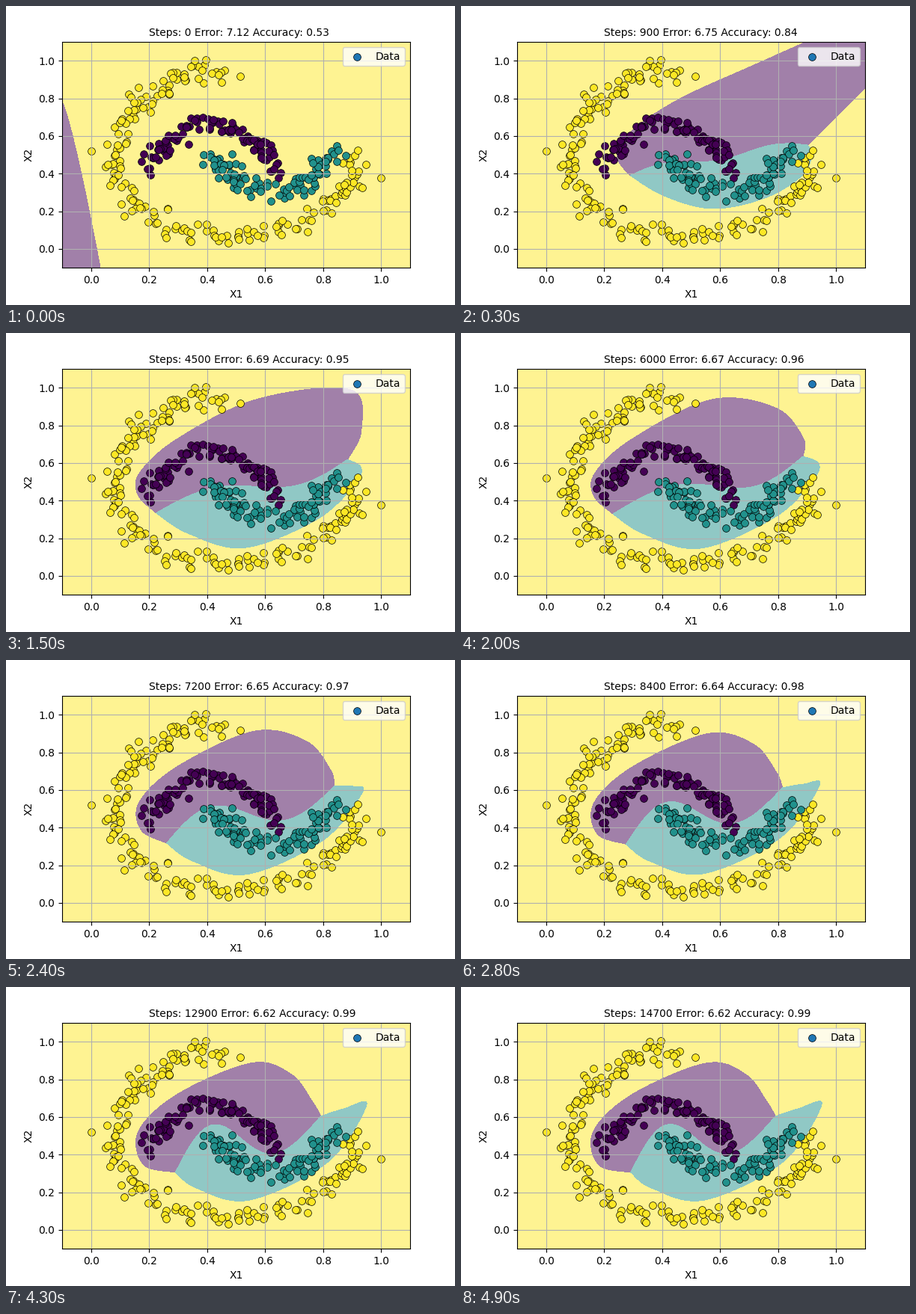
Recreate the animation shown at these times as a matplotlib script. Size 600 px wide and 400 px high, loop 5 s.

```python
import numpy as np
import matplotlib.pyplot as plt
from matplotlib.animation import FuncAnimation

FRAMES, INTERVAL, STEPS_PER_FRAME = 50, 100, 300
PURPLE, TEAL, YELLOW = "#440154", "#21918c", "#fde725"
PURPLE_AREA, TEAL_AREA, YELLOW_AREA = "#a180a9", "#90c8c5", "#fef392"

# Key outlines in stage pixels: clockwise from the left seam end,
# with the right seam end at index SPLIT.
SPLIT = 7
OPEN = np.array([
    (190, 235), (172, 212), (177, 186), (230, 141), (340, 86), (650, -40), (560, 80),
    (453, 190), (459, 207), (440, 239), (385, 270), (310, 284), (240, 265)], float)
CLOSED = np.array([
    (203, 242), (177, 217), (180, 186), (230, 141), (335, 89), (420, 100), (457, 140),
    (457, 165), (478, 175), (470, 197), (420, 246), (320, 288), (245, 269)], float)
FINAL = np.array([
    (227, 248), (184, 238), (177, 193), (230, 143), (328, 102), (380, 117), (408, 153),
    (420, 173), (450, 163), (482, 157), (430, 234), (325, 285), (255, 269)], float)
# Height and skew of the S-shaped seam.
OPEN_WAVE, CLOSED_WAVE, FINAL_WAVE = np.array([(0, 11), (17, -5), (36, 13)], float)
OPEN_MS, CLOSED_MS = 800, 2000


def to_data(points):
    x, y = np.asarray(points, float).T
    return np.column_stack([(x - 75) / 465 * 1.2 - 0.1, (350 - y) / 302 * 1.2 - 0.1])


def spline(points, samples=16):
    """Catmull-Rom curve through the points."""
    p = np.vstack([points[0], points, points[-1]])
    u = np.linspace(0, 1, samples)[:, None]
    return np.vstack([
        b + 0.5 * u * (c - a + u * (2 * a - 5 * b + 4 * c - d + u * (3 * (b - c) + d - a)))
        for a, b, c, d in zip(p, p[1:], p[2:], p[3:])])


def pose(ms):
    """Outline and seam wave at a time, eased between the key outlines."""
    if ms < CLOSED_MS:
        u = max(0, (ms - OPEN_MS) / (CLOSED_MS - OPEN_MS))
        u = 1 - (1 - u) ** 2
        return OPEN + u * (CLOSED - OPEN), OPEN_WAVE + u * (CLOSED_WAVE - OPEN_WAVE)
    u = 1 - np.exp((CLOSED_MS - ms) / 600)
    return CLOSED + u * (FINAL - CLOSED), CLOSED_WAVE + u * (FINAL_WAVE - CLOSED_WAVE)


def untrained_regions():
    """A purple wedge in the lower left corner and no teal."""
    s = np.linspace(0, 1, 40)
    edge = np.column_stack([75 + 51 * s ** 0.82, 128 + 222 * s])
    return np.vstack([edge, (75, 350)]), np.full((3, 2), 900.0)


def regions(ms):
    """Outlines of the purple and the teal region."""
    if ms == 0:
        return untrained_regions()
    outline, (height, skew) = pose(ms)
    if ms < OPEN_MS:
        # The wedge grows in from the right.
        anchor = np.array([560, 150])
        outline = anchor + (1 - 0.25 * (1 - ms / OPEN_MS) ** 2) * (outline - anchor)
    left, right = outline[0], outline[SPLIT]
    u = np.linspace(0, 1, 60)
    seam = left + u[:, None] * (right - left)
    seam[:, 1] -= (height + skew * np.cos(np.pi * u)) * np.sin(2 * np.pi * u)
    top = spline(outline[:SPLIT + 1])
    bottom = spline(np.vstack([outline[SPLIT:], left]))
    return np.vstack([top, seam[::-1]]), np.vstack([seam, bottom])


def error_at(step):
    return 6.615 + 0.09 / (1 + (step / 6800) ** 4) + 0.415 * np.exp(-step / 400)


def accuracy_at(step):
    return 0.993 - 0.063 * np.exp(-(step / 7000) ** 2) - 0.4 * np.exp(-step / 600)


rng = np.random.default_rng(4)


def cloud(path, count, spread):
    """Points scattered along a curve."""
    curve = spline(np.array(path, float))
    pick = np.linspace(0, len(curve) - 1, count).astype(int)
    return curve[pick] + spread * np.clip(rng.normal(size=(count, 2)), -1.7, 1.7)


ring = cloud([(298, 88), (238, 90), (203, 118), (162, 144), (143, 200), (158, 250),
              (205, 287), (270, 307), (345, 302), (420, 274), (458, 238), (466, 208)], 188, 9)
ring = np.vstack([ring, (114, 194), (501, 230)])
upper_moon = cloud([(193, 220), (207, 192), (235, 172), (268, 158), (300, 164),
                    (328, 180), (346, 200), (360, 217)], 100, 7.5)
lower_moon = cloud([(276, 203), (290, 208), (308, 230), (330, 242), (375, 248),
                    (405, 232), (422, 210), (442, 196)], 100, 8)

plt.rcParams["font.family"] = "DejaVu Sans"
fig, ax = plt.subplots(figsize=(6, 4), dpi=100)
fig.subplots_adjust(left=0.125, right=0.9, bottom=0.125, top=0.88)
ax.set(xlim=(-0.1, 1.1), ylim=(-0.1, 1.1), xlabel="X1", ylabel="X2", facecolor=YELLOW_AREA)
ax.set_autoscale_on(False)
ax.grid(True)

areas = [ax.fill([0], [0], color=color, lw=0, antialiased=False, zorder=0.5)[0]
         for color in (PURPLE_AREA, TEAL_AREA)]
dots = dict(s=50, edgecolors="black", linewidths=0.5)
for points, color in ((ring, YELLOW), (upper_moon, PURPLE), (lower_moon, TEAL)):
    ax.scatter(*to_data(points).T, c=color, **dots)
ax.scatter([], [], c="#1f77b4", label="Data", **dots)
ax.legend(loc="upper right")
title = ax.text(0.25, 1.027, "", transform=ax.transAxes, fontsize=10)


def update(frame):
    step = frame * STEPS_PER_FRAME
    for area, outline in zip(areas, regions(frame * INTERVAL)):
        area.set_xy(to_data(outline))
    title.set_text(f"Steps: {step} Error: {error_at(step):.2f} "
                   f"Accuracy: {accuracy_at(step):.2f}")
    return [*areas, title]


anim = FuncAnimation(fig, update, frames=FRAMES, interval=INTERVAL, repeat=True, repeat_delay=0)
plt.show()
```
